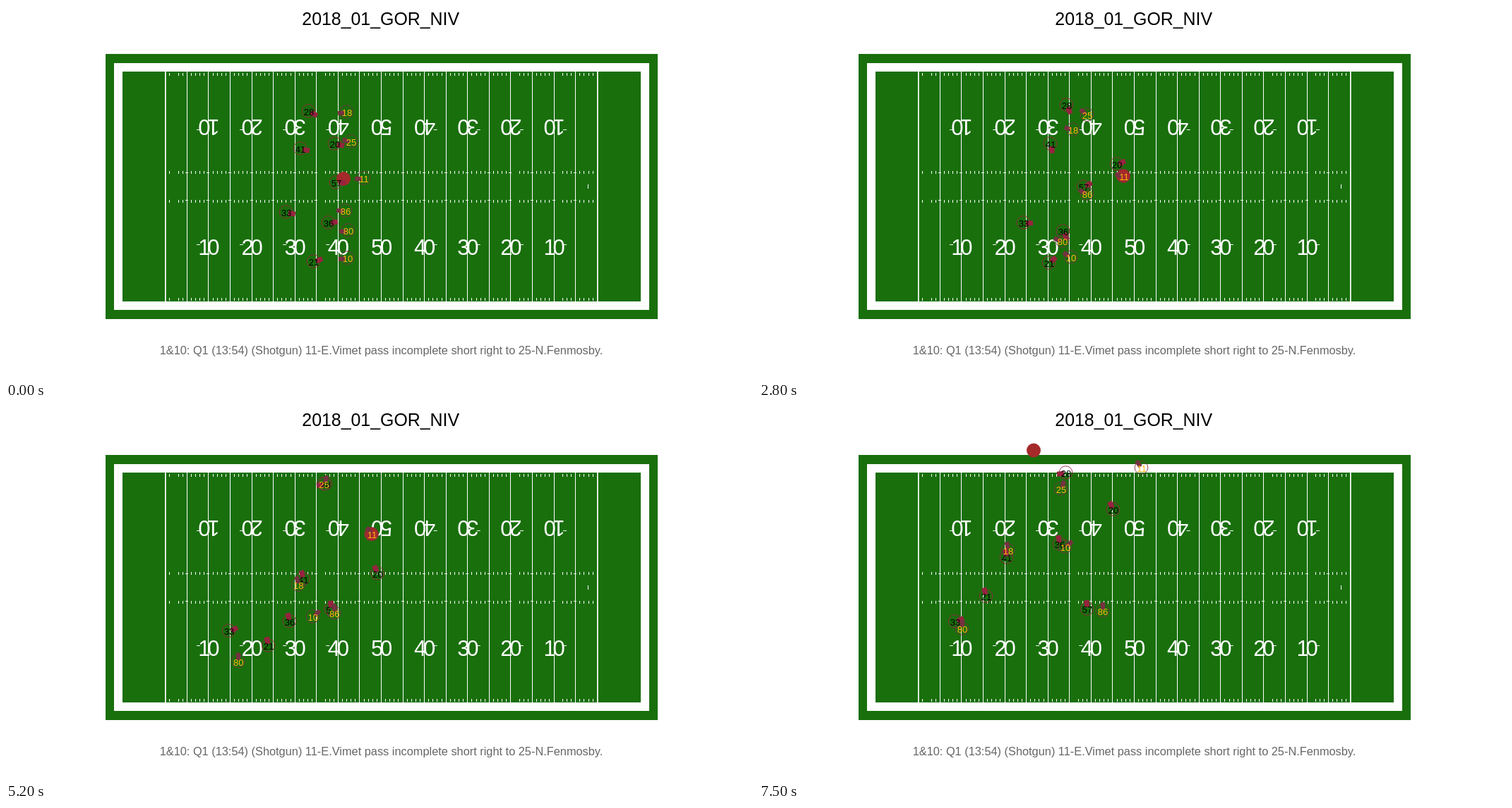
Animation of 1058 by 529 pixels, one loop 7.6 s. Source, as an HTML page with a canvas:

```html
<!DOCTYPE html>
<html lang="en">
<head>
<meta charset="utf-8">
<title>Play tracking</title>
<style>
html, body { margin: 0; width: 100%; height: 100%; overflow: hidden; background: #fff; }
canvas { display: block; }
</style>
</head>
<body>
<canvas id="stage" width="1058" height="529"></canvas>
<script>
const ctx = document.getElementById('stage').getContext('2d');
const FONT = '"Liberation Sans", Arial, sans-serif';
const GREEN = '#196f0c', WHITE = '#fff', BALL = '#a52a2a';
const HOME = { text: '#000', nub: '#97233f', width: 7 };
const AWAY = { text: '#ffb612', nub: '#773141', width: 6 };

const LOOP = 7600, STEP = 100, END = 7500;
const SNAP = 800, CATCH = 1700, THROW = 6400;
// Every route has one point for each of these moments
const MOMENTS = [1400, 2800, 4600, END];
const TURN_END = 5500;

const YARD = 6.115, MID_X = 531.5, MID_Y = 256;
const HALF_LENGTH = 60, HALF_WIDTH = 26.67;
const yardX = yard => MID_X + (yard - 50) * YARD;

const clamp = u => Math.min(1, Math.max(0, u));
const progress = (t, from, to) => clamp((t - from) / (to - from));
const smooth = u => u * u * (3 - 2 * u);
const mix = (a, b, u) => a + (b - a) * u;

// Cubic path that starts at rest and bends as a parabola at each inner point
function along(values, t) {
  const last = values.length - 1;
  const secant = i => (values[i + 1] - values[i]) / (MOMENTS[i + 1] - MOMENTS[i]);
  const slope = i => {
    if (i === 0) return 0;
    if (i === last) return 2 * secant(i - 1) - slope(i - 1);
    const before = MOMENTS[i] - MOMENTS[i - 1], after = MOMENTS[i + 1] - MOMENTS[i];
    return (secant(i - 1) * after + secant(i) * before) / (before + after);
  };
  let i = 0;
  while (i < last - 1 && t > MOMENTS[i + 1]) i++;
  const span = MOMENTS[i + 1] - MOMENTS[i];
  const u = progress(t, MOMENTS[i], MOMENTS[i + 1]);
  const ease = smooth(u);
  return mix(values[i], values[i + 1], ease)
    + span * u * (1 - u) * (slope(i) * (1 - u) - slope(i + 1) * u);
}

const player = (team, number, x, y, faceFrom, faceTo) =>
  ({ team, number, x, y, faceFrom, faceTo });

const passer = player(AWAY, 11, [507, 517, 516, 542], [246, 243, 201, 88], 180, 235);
const players = [
  player(HOME, 28, [429, 436, 452, 435], [151, 142, 117, 95], 25, 175),
  player(HOME, 20, [466, 507, 526, 502], [197, 226, 245, 147], 10, -115),
  player(HOME, 41, [417, 413, 427, 351], [204, 197, 241, 215], 10, 260),
  player(HOME, 57, [468, 460, 460, 465], [252, 258, 284, 288], -5, -95),
  player(HOME, 33, [397, 375, 329, 278], [294, 309, 319, 306], 10, -25),
  player(HOME, 36, [457, 431, 404, 426], [309, 321, 319, 196], -10, 260),
  player(HOME, 21, [436, 411, 383, 322], [364, 366, 351, 270], -20, -105),
  player(AWAY, 18, [483, 445, 425, 353], [152, 177, 247, 205], 175, 260),
  player(AWAY, 25, [489, 465, 455, 428], [194, 156, 117, 118], 195, 290),
  passer,
  player(AWAY, 86, [481, 465, 463, 487], [292, 268, 290, 291], 185, 270),
  player(AWAY, 80, [485, 430, 349, 288], [320, 335, 363, 316], 175, 270),
  player(AWAY, 10, [484, 442, 436, 434], [359, 358, 318, 200], 175, 318)
];

const place = (p, t) => ({ x: along(p.x, t), y: along(p.y, t) });

// On the ground until the snap, then carried, then thrown
function ballAt(t) {
  const start = { x: 478, y: 245 }, landing = { x: 389, y: 61.5 };
  const hand = place(passer, Math.min(t, THROW));
  hand.x -= 1;
  hand.y -= 2;
  const thrown = t > THROW;
  const from = thrown ? hand : start, to = thrown ? landing : hand;
  const u = thrown ? progress(t, THROW, END) : progress(t, SNAP, CATCH);
  return { x: mix(from.x, to.x, u), y: mix(from.y, to.y, u) };
}

function rect(color, x, y, w, h) {
  ctx.fillStyle = color;
  ctx.fillRect(x, y, w, h);
}

function circle(x, y, r) {
  ctx.beginPath();
  ctx.arc(x, y, r, 0, Math.PI * 2);
}

function label(text, x, y, size, color) {
  ctx.font = `${size}px ${FONT}`;
  ctx.textAlign = 'center';
  ctx.fillStyle = color;
  ctx.fillText(text, x, y);
}

function yardNumber(text, x, y, turn) {
  ctx.save();
  ctx.translate(x, y);
  ctx.rotate(turn);
  [...text].forEach((digit, i) => label(digit, i * 13 - 6.5, 11, 31, WHITE));
  ctx.restore();
}

function drawTurf(color, margin) {
  const w = Math.round((HALF_LENGTH + margin) * YARD);
  const h = Math.round((HALF_WIDTH + margin) * YARD);
  rect(color, Math.ceil(MID_X) - w, MID_Y - h, 2 * w, 2 * h);
}

function drawField() {
  drawTurf(GREEN, 4);
  drawTurf(WHITE, 2);
  drawTurf(GREEN, 0);

  const gaps = [2, 36, 81, 91];
  for (let yard = 0; yard <= 100; yard++) {
    const x = Math.floor(yardX(yard));
    if (yard % 100 === 0) {
      rect(WHITE, x, 93, 1.7, 326);
    } else if (yard % 5 === 0) {
      rect(WHITE, x, 93, 1, 326);
      for (const y of [236, 275]) rect(WHITE, x - 2, y, 4, 1);
    } else if (!gaps.includes(yard)) {
      for (const y of [95, 234, 275, 414]) rect(WHITE, x, y, 1, 4);
    }
  }
  rect(WHITE, 824, 253, 1, 6);

  for (let yard = 10; yard <= 90; yard += 10) {
    const x = yardX(yard) + 0.5, side = Math.sign(yard - 50);
    const text = String(50 - Math.abs(50 - yard));
    yardNumber(text, x, 172, Math.PI);
    yardNumber(text, x, 342, 0);
    if (side) for (const y of [175, 338]) rect(WHITE, x + side * 15 - 2.5, y, 5, 1);
  }
}

function drawMarker(p, t) {
  const { x, y } = place(p, t);
  const turn = smooth(progress(t, MOMENTS[0], TURN_END));
  const face = mix(p.faceFrom, p.faceTo, turn) * Math.PI / 180;
  const dx = Math.cos(face), dy = Math.sin(face);
  ctx.strokeStyle = p.team.nub;
  ctx.lineWidth = 0.9;
  circle(x - 0.5, y - 2, 9.3);
  ctx.stroke();
  ctx.lineWidth = p.team.width;
  ctx.beginPath();
  ctx.moveTo(x + dx * 3, y - 1 + dy * 3);
  ctx.lineTo(x + dx * 13, y - 1 + dy * 13);
  ctx.stroke();
}

function drawNumber(p, t) {
  const { x, y } = place(p, t);
  label(p.number, x, y + 4.2, 13, p.team.text);
}

function draw(t) {
  rect(WHITE, 0, 0, 1058, 529);
  label('2018_01_GOR_NIV', 530.7, 26.5, 24.9, '#000');
  label('1&10: Q1 (13:54) (Shotgun) 11-E.Vimet pass incomplete short right to 25-N.Fenmosby.',
    531.5, 494, 16.35, '#666');
  drawField();

  const ball = ballAt(t);
  ctx.fillStyle = BALL;
  circle(ball.x, ball.y, 10);
  ctx.fill();

  for (const team of [HOME, AWAY]) {
    const side = players.filter(p => p.team === team);
    side.forEach(p => drawMarker(p, t));
    side.forEach(p => drawNumber(p, t));
  }
}

function frame() {
  const t = performance.now() % LOOP;
  draw(Math.floor(t / STEP) * STEP);
  requestAnimationFrame(frame);
}
frame();
</script>
</body>
</html>
```
